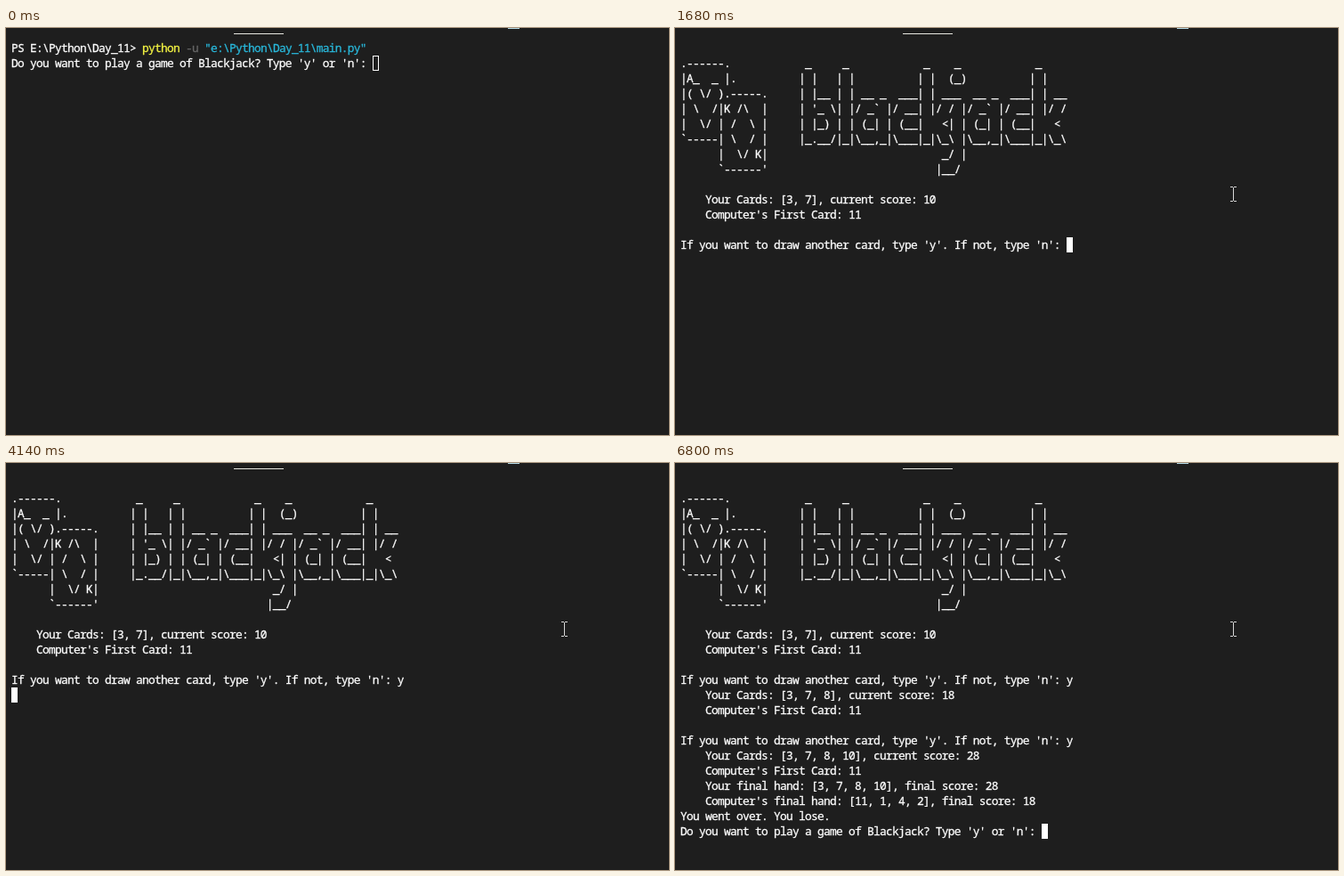
An HTML page for the animation above (8 s loop, 745x457 px).

```html
<!DOCTYPE html>
<html lang="en">
<head>
<meta charset="utf-8">
<style>
  html, body { margin: 0; width: 100%; height: 100%; overflow: hidden; background: #1e1e1e; }
  /* Glyphs 7.7px wide, set tightly on the terminal's 7px grid. */
  pre {
    position: absolute; left: 6px; top: 14px; margin: 0; color: #fff;
    font: 500 12.8333px/17px "Noto Sans Mono", "DejaVu Sans Mono", monospace;
    letter-spacing: -.7px; -webkit-text-stroke: .3px;
  }
  .cmd { color: #f5f543; }
  .flag { color: #666; }
  .str { color: #29b8db; }
  .caret {
    display: inline-block; box-sizing: border-box; width: 7px; height: 17px;
    vertical-align: top; border: 1px solid #fff;
  }
  .focus .caret { background: #fff; }
  .bar { position: absolute; height: 1px; background: #e7e7e0; }
  #mouse { position: absolute; left: 0; top: 0; overflow: visible; }
  [hidden] { display: none; }
</style>
</head>
<body>
<div class="bar" style="left:256px;top:6px;width:56px"></div>
<div class="bar" style="left:564px;top:0;width:13px;background:#b5d9e5"></div>

<pre id="intro">PS E:\Python\Day_11&gt; <span class="cmd">python</span> <span class="flag">-u</span> <span class="str">"e:\Python\Day_11\main.py"</span>
Do you want to play a game of Blackjack? Type 'y' or 'n': <span data-at="1220">y</span><span data-at="1620">
</span><i class="caret"></i></pre>

<pre id="game">

.------.            _     _            _    _            _
|A_  _ |.          | |   | |          | |  (_)          | |
|( \/ ).-----.     | |__ | | __ _  ___| | ___  __ _  ___| | __
| \  /|K /\  |     | '_ \| |/ _` |/ __| |/ / |/ _` |/ __| |/ /
|  \/ | /  \ |     | |_) | | (_| | (__|   &lt;| | (_| | (__|   &lt;
`-----| \  / |     |_.__/|_|\__,_|\___|_|\_\ |\__,_|\___|_|\_\
      |  \/ K|                            _/ |
      `------'                           |__/

    Your Cards: [3, 7], current score: 10
    Computer's First Card: 11

If you want to draw another card, type 'y'. If not, type 'n': <span data-at="4000">y</span><span data-at="4140">
</span><span data-at="4210">    Your Cards: [3, 7, 8], current score: 18
    Computer's First Card: 11

If you want to draw another card, type 'y'. If not, type 'n': </span><span data-at="6670">y</span><span data-at="6800">
    Your Cards: [3, 7, 8, 10], current score: 28
    Computer's First Card: 11
    Your final hand: [3, 7, 8, 10], final score: 28
    Computer's final hand: [11, 1, 4, 2], final score: 18
You went over. You lose.
Do you want to play a game of Blackjack? Type 'y' or 'n': </span><i class="caret"></i></pre>

<svg id="mouse" width="1" height="1">
  <path d="M-3 -7.5h3m1 0h3M.5 -7v15M-3 8.5h3m1 0h3" fill="none" stroke="#d8d8d8"/>
</svg>

<script>
const LOOP = 8000, GAME_START = 1680;
const MOVE_START = 70, MOVE_STEP = 80, CLICK = 470;
const [intro, game, mouse] = ["intro", "game", "mouse"].map(id => document.getElementById(id));
const typed = [...document.querySelectorAll("[data-at]")];

function draw(t) {
  intro.hidden = t >= GAME_START;
  game.hidden = t < GAME_START;
  for (const part of typed) part.hidden = t < +part.dataset.at;
  document.body.className = t >= CLICK ? "focus" : "";

  // The pointer rises in coarse steps and settles before the click.
  const step = Math.floor((t - MOVE_START) / MOVE_STEP);
  const left = (1 - Math.min(Math.max(step, 0) / 4, 1)) ** 2;
  mouse.style.display = step < 0 ? "none" : "block";
  mouse.style.transform = `translate(${Math.round(627 + 28 * left)}px, ${Math.round(186 + 187 * left)}px)`;
}

const start = performance.now();
function tick() {
  draw((performance.now() - start) % LOOP);
  requestAnimationFrame(tick);
}
tick();
</script>
</body>
</html>
```
